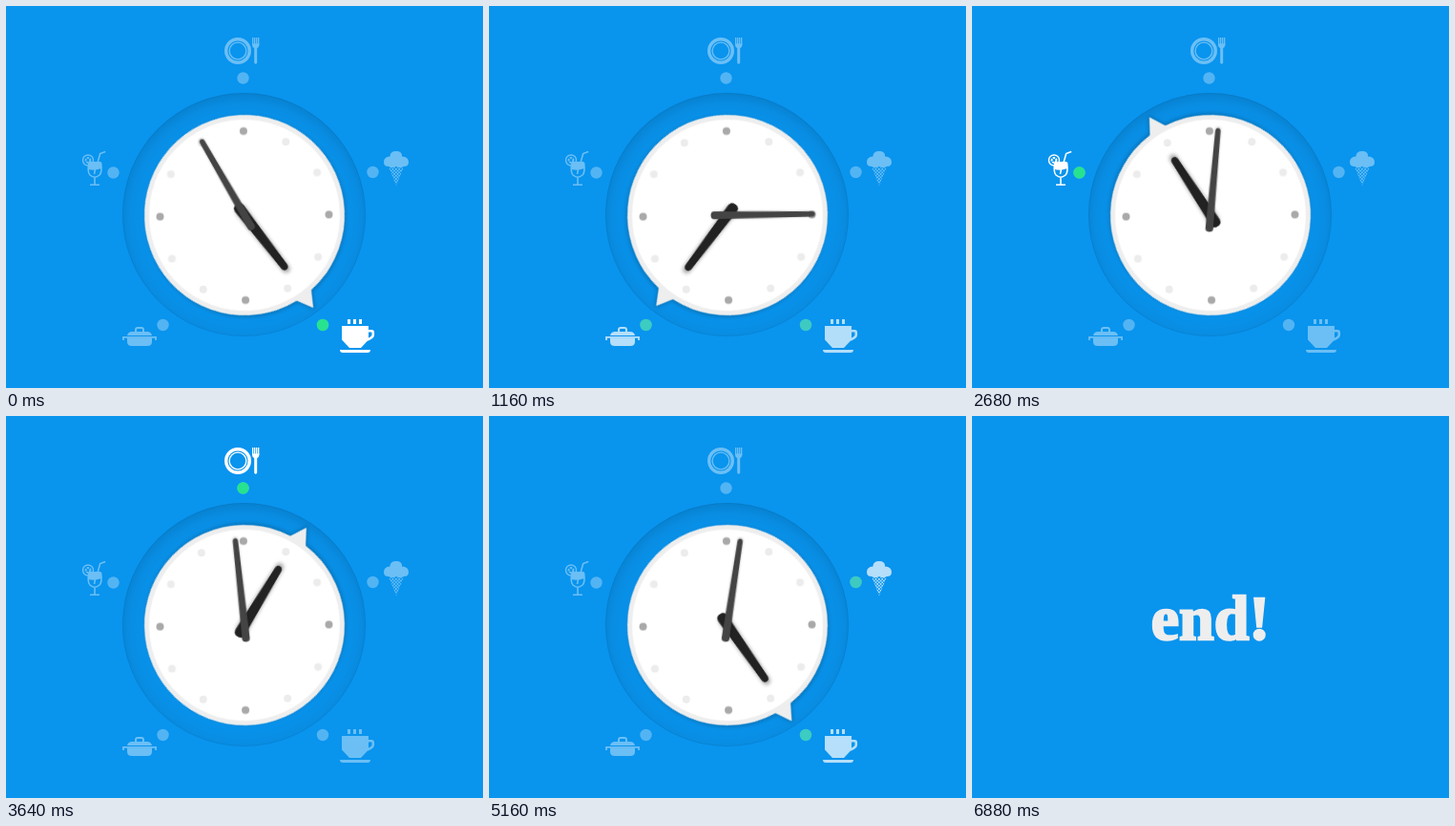
These frames come from a looping animation (500 by 400 pixels, 7120 ms). An HTML page:

```html
<!DOCTYPE html>
<html lang="en">
<head>
<meta charset="utf-8">
<title>Meal clock</title>
<style>
html, body { margin: 0; width: 100%; height: 100%; overflow: hidden; background: #0994ee; }
svg { display: block; width: 500px; height: 400px; }
#face { filter: drop-shadow(0 -2px 2px rgba(0,0,0,.22)); }
#hour { filter: drop-shadow(0 -3px 2px rgba(0,0,0,.4)); }
#minute { filter: drop-shadow(0 -1px 1px rgba(0,0,0,.3)); }
.line { fill: none; stroke: #fff; }
#end { font: bold 66px "Liberation Serif", serif; fill: #eee; stroke: #eee; stroke-width: 2.4; text-anchor: middle; }
</style>
</head>
<body>
<svg viewBox="0 0 500 400">
  <defs>
    <radialGradient id="well" gradientUnits="userSpaceOnUse" cx="0" cy="4" r="131.5">
      <stop offset=".8" stop-opacity=".015"/>
      <stop offset=".92" stop-opacity=".045"/>
      <stop offset="1" stop-opacity=".12"/>
    </radialGradient>
    <pattern id="wafer" width="3.4" height="3.4" patternUnits="userSpaceOnUse">
      <path d="M0 0h1.700v1.700h-1.700zM1.700 1.700h1.700v1.700h-1.700z" fill="#fff"/>
    </pattern>
    <clipPath id="iris"><circle id="hole" r="110"/></clipPath>
  </defs>

  <g transform="translate(250 219)">
    <g id="clock">
      <circle cx="-.5" cy="-.5" r="127.5" fill="url(#well)"/>
      <circle cx="-.5" cy="-.5" r="127" fill="none" stroke="#000" stroke-opacity=".06"/>
      <g id="face">
        <path d="M0-121L11-102H-11Z" fill="#eee"/>
        <circle r="105" fill="#eee"/>
        <circle r="100" fill="#fff"/>
      </g>
      <g id="marks" transform="translate(0 .5) rotate(-.7)"></g>
      <g clip-path="url(#iris)">
        <path id="hour" d="M-5.7 8.500Q-5.500 14 0 14T5.700 8.500L3.800-68Q3.500-72 0-72T-3.800-68Z" fill="#222"/>
        <path id="minute" d="M-4 14Q-4 17.500 0 17.500T4 14L2.700-89Q2.500-91.500 0-91.500T-2.700-89Z" fill="#444"/>
      </g>
    </g>

    <g id="dots"></g>

    <g class="orbit">
      <g class="icon" fill="#fff"><g transform="translate(-250 -219)">
        <path d="M352 335h28v14.500l-8 8.500h-12l-8-8.500zM350 360h32q0 3-3 3h-26q-3 0-3-3z"/>
        <path class="line" stroke-width="2.6" d="M379 340.300h4.200q1.600 0 1.600 1.600v2.600q0 2.500-6 5"/>
        <path class="line" stroke-width="3" d="M359.500 328v5M365.500 328v5M371.500 328v5"/>
      </g></g>
      <g class="icon" fill="#fff"><g transform="translate(-250 -219)">
        <path class="line" stroke-width="2" d="M136 342v-3q0-2 2-2h4q2 0 2 2v3"/>
        <path d="M127 345q1-4 5-4h16q4 0 5 4zM127 347.500h26v4q0 4.500-5 4.500h-16q-5 0-5-4.500z"/>
        <path class="line" stroke-width="1.800" d="M123 350v-3.200h34v3.200"/>
      </g></g>
      <g class="icon" fill="#fff"><g transform="translate(-250 -219)">
        <circle class="line" cx="86" cy="161.500" r="5.500" stroke-width="1.400"/>
        <circle class="line" cx="86" cy="161.500" r="2.400" stroke-width="2" stroke-dasharray="2.200 .8"/>
        <path d="M86.500 163h13l.5 7q-7 3-14 1z"/>
        <path class="line" stroke-width="1.600" d="M87 164q-2 10 1 13 5 4.500 10 0 3-3 1.500-13M93 179v8M88 187.300h10M96 164l2.700-9.500 5.500-2M93.500 171l-1 5"/>
      </g></g>
      <g class="icon" fill="#fff"><g transform="translate(-250 -219)">
        <circle class="line" cx="243" cy="47" r="12.300" stroke-width="3.400"/>
        <circle class="line" cx="243" cy="47" r="8.900" stroke-width="1.400"/>
        <path class="line" stroke-width="1.300" d="M258.700 33v8M260.700 33v8M262.700 33v8M264.700 33v8"/>
        <path d="M258 39.500h7.400q0 4-2.200 4.500v15.500q-1.500 2.500-3 0v-15.500q-2.200-.5-2.200-4.500z"/>
      </g></g>
    </g>
    <g class="orbit">
      <g class="icon" fill="#fff"><g transform="translate(-250 -219)">
        <path d="M402.500 157.500q0-5.500 6.500-5.500t6 5.500q7 .5 7 6 0 4.500-5 4.500-4 2.500-8 0-4 2.500-8 0-5 0-5-4.500 0-5.500 6.500-6z"/>
        <path d="M401.500 169.500h15l-7.500 19z" fill="url(#wafer)"/>
      </g></g>
    </g>
  </g>
  <g transform="translate(250 219)"><text id="end" y="14.500">end!</text></g>
</svg>

<script>
const LOOP = 7120, START = 320, STEP = 1000;
const $ = id => document.getElementById(id);

// rows: [time in ms, properties, easing to the next row]
function play(el, rows) {
  const last = rows[rows.length - 1];
  const all = [[0, rows[0][1]], ...rows, [LOOP, last[1]]];
  el.animate(
    all.map(([t, props, easing = 'linear']) => ({ offset: t / LOOP, easing, ...props })),
    { duration: LOOP, iterations: Infinity });
}

function circle(parent, x, y, r, fill, opacity = 1) {
  const c = document.createElementNS('http://www.w3.org/2000/svg', 'circle');
  const attrs = { cx: x, cy: y, r, fill, opacity };
  for (const k in attrs) c.setAttribute(k, attrs[k]);
  parent.append(c);
  return c;
}

for (let i = 0; i < 12; i++) {
  const a = i * Math.PI / 6;
  circle($('marks'), 88.5 * Math.sin(a), -88.5 * Math.cos(a), 4, i % 3 ? '#ececec' : '#a9a9a9');
}

// five swings around the dial, each running past its stop and settling back
const OVER = 1.07, PEAK = .7 * STEP;
function swing(el, angles) {
  const pose = a => ({ transform: `rotate(${a}deg)` });
  play(el, angles.flatMap((a, k) => {
    const t = START + k * STEP, next = angles[k + 1];
    const rest = [t, pose(a), 'ease-in-out'];
    return next === undefined ? [rest]
      : [rest, [t + PEAK, pose(a + OVER * (next - a)), 'ease-in-out']];
  }));
}
const turns = first => [0, 1, 2, 3, 4, 5].map(k => first + 72 * k);
swing($('face'), turns(143.4));
swing($('hour'), turns(142.2));
swing($('minute'), [330, 1138, 2066, 2880, 3651, 4650]);

// each stop lights up as the pointer settles on it
function light(el, i, off, on) {
  const rows = [];
  const fade = (t, a, b) => rows.push([t, { opacity: a }], [t + 200, { opacity: b }]);
  if (i) fade(60 + i * STEP, off, on);
  fade(60 + (i + 1) * STEP, on, off);
  if (!i) fade(60 + 5 * STEP, off, on);
  play(el, rows);
}

const stops = [[82, 115], [-85.5, 115], [-137.5, -44.5], [-1.5, -143.5], [134.5, -45]];
const icons = document.querySelectorAll('.icon');
stops.forEach(([x, y], i) => {
  circle($('dots'), x, y, 6.2, '#fff', .3);
  light(circle($('dots'), x, y, 6.2, '#27e28f'), i, 0, 1);
  light(icons[i], i, .4, 1);
});

// everything around the dial spins away
const leave = (el, turn) => play(el, [
  [5640, { transform: 'rotate(0deg) scale(1)', opacity: 1 }],
  [6000, { transform: `rotate(${turn}deg) scale(.84)`, opacity: 0 }]]);
const [slow, fast] = document.querySelectorAll('.orbit');
leave(slow, 247);
leave($('dots'), 370);
leave(fast, 491);
play($('hole'), [[5640, { r: '95px' }], [6000, { r: '0px' }]]);

play($('clock'), [
  [6280, { transform: 'scale(1)', opacity: 1 }, 'ease-in'],
  [6640, { transform: 'scale(0)', opacity: 1 }]]);
play($('end'), [
  [6560, { transform: 'scale(0)', opacity: 0 }, 'ease-out'],
  [6880, { transform: 'scale(1)', opacity: 1 }]]);
</script>
</body>
</html>
```
